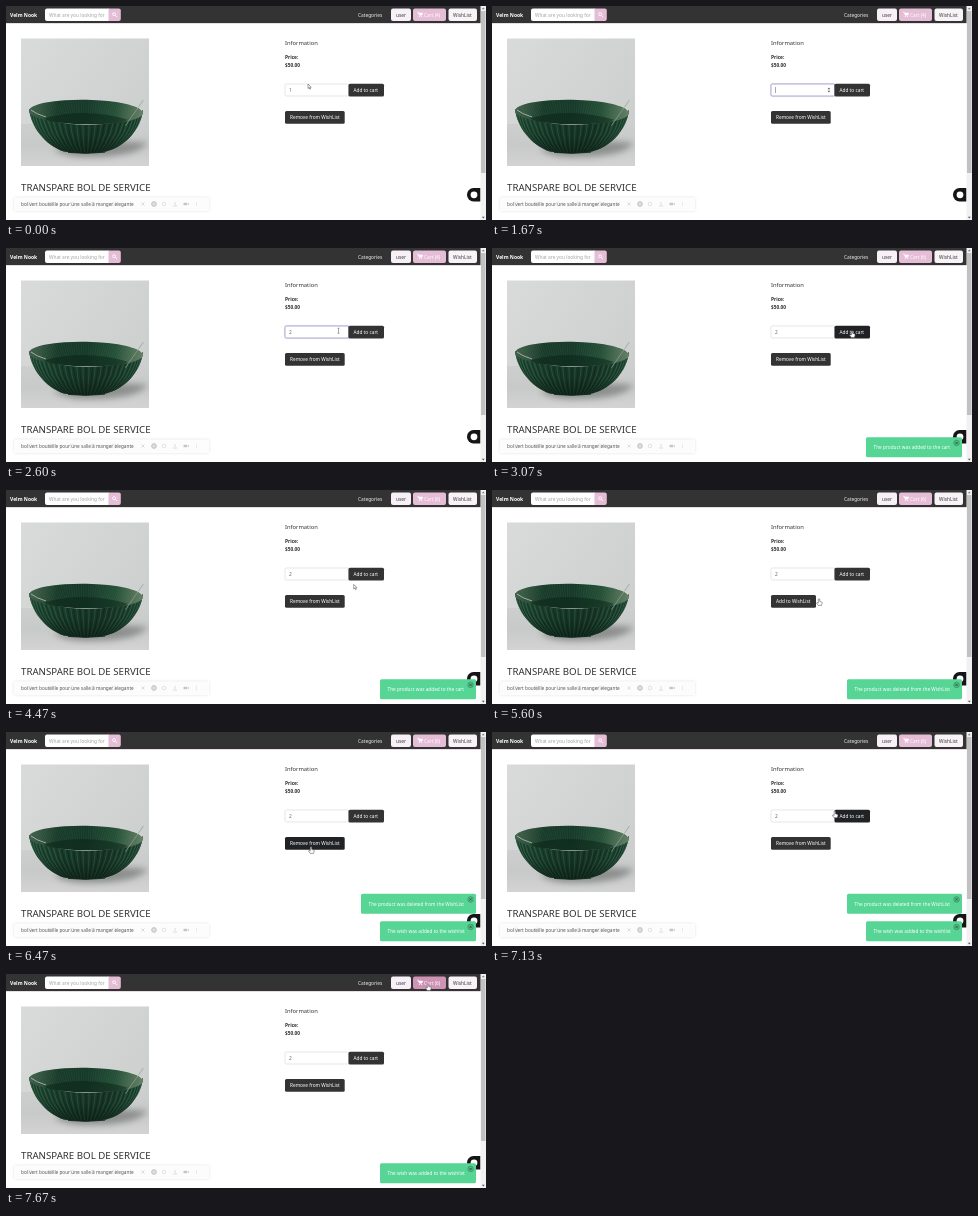
Write an HTML page with a canvas that moves like this. It is 480 px wide and 214 px high and loops after 8000 ms.

```html
<!DOCTYPE html>
<html lang="en">
<head>
<meta charset="utf-8">
<title>Shop product page</title>
<style>
html, body { margin: 0; width: 100%; height: 100%; overflow: hidden; background: #fff; }
canvas { display: block; width: 480px; height: 214px; }
</style>
</head>
<body>
<canvas id="stage"></canvas>
<script>
const W = 480, H = 214, LOOP = 8000;
const canvas = document.getElementById('stage');
const dpr = window.devicePixelRatio || 1;
canvas.width = W * dpr;
canvas.height = H * dpr;
const c = canvas.getContext('2d');
const FONT = '"Noto Sans", "Open Sans", sans-serif';
const DARK = '#333333', INK = '#2b2b2b', PINK = '#e6bdd6';

const clamp = v => Math.max(0, Math.min(1, v));
const ease = v => v * v * (3 - 2 * v);
const ramp = (t, a, b) => ease(clamp((t - a) / (b - a)));
const within = (t, a, b) => t >= a && t < b;

function box(x, y, w, h, r, fill, line) {
  c.beginPath();
  c.roundRect(x, y, w, h, r);
  if (fill) { c.fillStyle = fill; c.fill(); }
  if (line) { c.strokeStyle = line; c.lineWidth = 0.7; c.stroke(); }
}

function text(s, x, y, size, color = INK, weight = 400) {
  c.font = `${weight} ${size}px ${FONT}`;
  c.fillStyle = color;
  c.fillText(s, x, y);
}

function path(d, fill, line, width = 0.7) {
  const p = new Path2D(d);
  if (fill) { c.fillStyle = fill; c.fill(p); }
  if (line) { c.strokeStyle = line; c.lineWidth = width; c.stroke(p); }
}

function blend(x0, y0, x1, y1, ...colors) {
  const g = c.createLinearGradient(x0, y0, x1, y1);
  colors.forEach((k, i) => g.addColorStop(i / (colors.length - 1), k));
  return g;
}

function dot(x, y, r, fill, line, width = 0.6) {
  c.beginPath();
  c.arc(x, y, r, 0, 7);
  if (fill) { c.fillStyle = fill; c.fill(); }
  if (line) { c.strokeStyle = line; c.lineWidth = width; c.stroke(); }
}

// Pointer stops: time, x, y
const STOPS = [
  [0, 302, 78], [70, 302, 78], [500, 296, 83], [870, 286, 84], [2130, 286, 84],
  [2530, 330, 80], [2930, 360, 83], [3530, 360, 83], [3800, 350, 92], [4400, 349, 93],
  [4800, 334, 110], [5100, 327, 109], [5730, 327, 109], [6270, 305, 115],
  [6930, 305, 115], [7300, 372, 52], [7600, 422, 10], [8000, 422, 10]
];

function pointer(t) {
  const i = Math.max(1, STOPS.findIndex(s => s[0] > t));
  const [t0, x0, y0] = STOPS[i - 1], [t1, x1, y1] = STOPS[i];
  const k = ramp(t, t0, t1);
  return [x0 + (x1 - x0) * k, y0 + (y1 - y0) * k];
}

function drawPointer(t, x, y, hand, beam) {
  if (within(t, 1270, 2130)) return;
  c.save();
  c.translate(x, y);
  if (beam) path('M-1 0H1M0 0V5M-1 5H1', null, '#555', 0.5);
  else if (hand) path('M-.7 0Q0-.7.7 0V2.4L2.8 3Q3.3 3.2 3.1 4.2L2.5 6.4H-.8L-2.5 3.9Q-2.2 3-.7 4Z', '#fff', '#444', 0.5);
  else path('M0 0V4.5L1.1 3.6 1.9 5.3 2.6 5 1.8 3.3H3.2Z', '#fff', '#444', 0.5);
  c.restore();
}

function cart(x, y) {
  path(`M${x} ${y}h1l.9 3h2.7l.8-2.2h-4Z`, '#fff', '#fff', 0.5);
  dot(x + 2, y + 4.3, 0.6, '#fff');
  dot(x + 4.3, y + 4.3, 0.6, '#fff');
}

function navbar(t, hot) {
  box(0, 0, W, 17.3, 0, DARK);
  box(0, 17.3, W, 0.7, 0, '#f3e3ed');
  text('Velm Nook', 4, 10.8, 5, '#fff', 700);
  box(39, 2.5, 64, 12.5, [2, 0, 0, 2], '#fff');
  c.save();
  c.beginPath();
  c.rect(39, 2, 60.5, 13);
  c.clip();
  text('What are you looking for', 43, 10.6, 4.8, '#a3a3a3');
  c.restore();
  box(102.5, 2.5, 12.3, 12.5, [0, 2, 2, 0], PINK);
  dot(108.1, 8.2, 1.5, null, '#fff', 0.8);
  path('M109.3 9.4l1.7 1.7', null, '#fff', 0.9);
  text('Categories', 352, 10.8, 4.8, '#eee');
  box(385, 2.5, 20, 12.5, 2, '#f7f1f7');
  text('user', 390, 10.8, 4.8, '#3b3b3b');
  box(407, 2.5, 33, 12.5, 2, hot ? '#cf93b6' : PINK);
  cart(411.3, 6.2);
  text(`Cart (${t < 3000 ? 4 : 6})`, 418, 10.8, 4.8, '#fff');
  box(442.5, 2.5, 28.5, 12.5, 2, '#f7f3f7');
  text('WishList', 447, 10.8, 4.8, '#3b3b3b');
}

function photo() {
  c.save();
  c.beginPath();
  c.rect(15, 32.5, 128, 127.5);
  c.clip();
  box(15, 32, 128, 128, 0, blend(15, 32, 143, 120, '#d9dada', '#d3d4d4', '#cdcece'));
  box(15, 118, 128, 42, 0, blend(0, 118, 0, 160, '#cdcece', '#c8c9c9', '#d3d3d3'));
  c.filter = 'blur(3px)';
  path('M48 143Q90 132 141 137Q132 151 82 151Q58 151 48 143Z', 'rgba(90,95,93,.55)');
  c.filter = 'none';

  const body = 'M23 103C25 121 39 139 58 145.5Q79 149 100 145.5C121 140 135 122 137 104Q118 119 80 119Q42 118 23 103Z';
  path(body, blend(25, 105, 135, 140, '#224f38', '#183b2a', '#173526', '#22503a'));
  c.save();
  c.clip(new Path2D(body));
  c.lineWidth = 0.55;
  for (let i = -26; i <= 26; i++) {
    const x = 80 + 57 * Math.sin(i * Math.PI / 54);
    c.strokeStyle = i % 2 ? 'rgba(105,150,121,.5)' : 'rgba(5,22,13,.55)';
    c.beginPath();
    c.moveTo(x, 102);
    c.quadraticCurveTo(x, 130, 80 + (x - 80) * 0.42, 148);
    c.stroke();
  }
  box(20, 103, 120, 46, 0, blend(0, 110, 0, 148, 'rgba(8,28,18,0)', 'rgba(8,28,18,.1)', 'rgba(8,25,16,.65)'));
  c.restore();

  c.save();
  c.translate(80, 106);
  c.rotate(0.018);
  c.beginPath();
  c.ellipse(0, 0, 57, 12.3, 0, 0, 7);
  c.fillStyle = blend(-57, -6, 57, 6, '#46654f', '#183a29', '#15382a', '#244f36', '#69836a');
  c.fill();
  c.save();
  c.clip();
  c.lineWidth = 0.4;
  c.strokeStyle = 'rgba(120,160,130,.25)';
  for (let i = -22; i <= 22; i++) {
    c.beginPath();
    c.moveTo(i * 2.6, -13);
    c.lineTo(i * 1.8, 13);
    c.stroke();
  }
  path('M-42 7Q0-5 42 7L30 14H-30Z', 'rgba(8,32,20,.5)');
  c.restore();
  c.strokeStyle = '#8fa18e';
  c.lineWidth = 0.7;
  c.stroke();
  c.restore();
  path('M25 104Q30 108 40 111M124 98.5Q135 101 136 105', null, 'rgba(210,222,205,.65)', 1);
  path('M62 146.4Q80 148.4 99 146.2', null, '#10251a', 0.9);
  c.restore();
}

function button(label, x, y, w, hot) {
  box(x, y, w, 12.7, 1.5, hot ? '#202225' : DARK);
  text(label, x + 5, y + 8.2, 4.75, '#fff');
}

function form(t, hotAdd, hotWish) {
  text('Information', 279, 38.7, 5.8, '#333');
  text('Price:', 279, 53, 4.8, INK, 700);
  text('$50.00', 279, 61, 4.8, INK, 700);
  const focus = within(t, 1000, 3000);
  if (focus) box(278.4, 77.4, 64.6, 13.2, 2, null, 'rgba(140,130,200,.25)');
  box(279, 78, 63.5, 12, [1.5, 0, 0, 1.5], '#fff', focus ? '#8d88ba' : '#dadcdf');
  if (t < 1400) {
    if (focus) box(282.2, 81, 4, 6.3, 0, '#a9c9f1');
    text('1', 283, 86, 4.8, '#666');
  } else if (t >= 1930) text('2', 283, 86, 4.8, '#666');
  if (within(t, 1400, 1930)) box(283, 81, 0.5, 6, 0, '#555');
  if (t < 2600 && t >= 500) path('M335.6 83.3h2.6l-1.3-1.7ZM335.6 84.7h2.6l-1.3 1.7Z', '#555');
  button('Add to cart', 342.5, 77.7, 35.5, hotAdd);
  const off = within(t, 5270, 6400);
  button(off ? 'Add to WishList' : 'Remove from WishList', 279, 105, off ? 45 : 59.7, hotWish);
}

function recorderBar() {
  c.save();
  c.shadowColor = 'rgba(0,0,0,.14)';
  c.shadowBlur = 3 * dpr;
  box(8, 191.5, 195, 13.5, 1, 'rgba(255,255,255,.9)');
  c.restore();
  text('bol vert bouteille pour une salle à manger elegante', 15, 200, 4.7, '#555');
  const pale = 'rgba(150,150,150,.4)';
  for (let i = 0; i < 5; i++) dot(24 + i * 21, 198, 2, null, pale, 0.5);
  path('M135.5 196.5l3 3M138.5 196.5l-3 3M167 200h4M169 196v3', null, '#c6c6c6', 0.6);
  dot(148, 198, 2.4, '#dedede', '#aaa');
  dot(158, 198, 1.8, null, '#d0d0d0');
  box(177.5, 196.7, 3.5, 2.6, 0.4, '#c6c6c6');
  path('M181 198l1.8-1.3v2.6Z', '#c6c6c6');
  for (let i = -1; i < 2; i++) dot(190.5, 198 + i * 1.6, 0.4, '#bbb');
}

function edge() {
  box(461, 182, 13.5, 13.5, [6.5, 0, 0, 6.5], '#151515');
  dot(468, 188.8, 3.4, '#fff');
  box(474.5, 0, 5.5, H, 0, '#f1f1f1');
  box(475, 5, 4.5, 162, 0, '#c1c1c1');
  path('M475.9 3.2h2.8l-1.4-1.6Z', '#777');
  path('M475.9 210.8h2.8l-1.4 1.6Z', '#555');
}

const TOASTS = [
  { s: 'The product was added to the cart', w: 96, from: 3000, to: 5070 },
  { s: 'The product was deleted from the WishList', w: 115, from: 5270, to: 7270, lift: 6330 },
  { s: 'The wish was added to the wishlist', w: 96, from: 6400, to: 9000 }
];

function toast(t, { s, w, from, to, lift }) {
  if (!within(t, from, to + 130)) return;
  const x = 470 - w, y = 189.2 - (lift ? 27.5 * ramp(t, lift, lift + 110) : 0);
  c.save();
  c.globalAlpha = (0.5 + 0.5 * ramp(t, from, from + 60)) * (1 - ramp(t, to, to + 130));
  box(x, y, w, 20, 1.5, '#56d594');
  text(s, x + 7.5, y + 11.8, 4.75, '#fff');
  dot(464.6, y + 5.7, 2.8, '#4fb883', '#347d59', 0.5);
  path(`M463.6 ${y + 4.7}l2 2M465.6 ${y + 4.7}l-2 2`, null, '#173e2a', 0.6);
  c.restore();
}

function draw(t) {
  c.setTransform(dpr, 0, 0, dpr, 0, 0);
  c.fillStyle = '#fff';
  c.fillRect(0, 0, W, H);
  const [x, y] = pointer(t);
  const over = (bx, by, w) => x > bx && x < bx + w && y >= by && y < by + 12.7;
  const hotCart = over(407, 2.5, 33);
  const hotAdd = over(342.5, 77.7, 35.5);
  const hotWish = over(279, 105, within(t, 5270, 6400) ? 45 : 59.7);
  navbar(t, hotCart);
  photo();
  text('TRANSPARE BOL DE SERVICE', 15, 184.5, 9.7, '#303030', 500);
  form(t, hotAdd, hotWish);
  recorderBar();
  edge();
  TOASTS.forEach(n => toast(t, n));
  drawPointer(t, x, y, hotCart || hotAdd || hotWish || within(t, 5200, 5800), over(279, 78.5, 55));
}

const start = performance.now();
function tick() {
  draw((performance.now() - start) % LOOP);
  requestAnimationFrame(tick);
}
tick();
</script>
</body>
</html>
```
